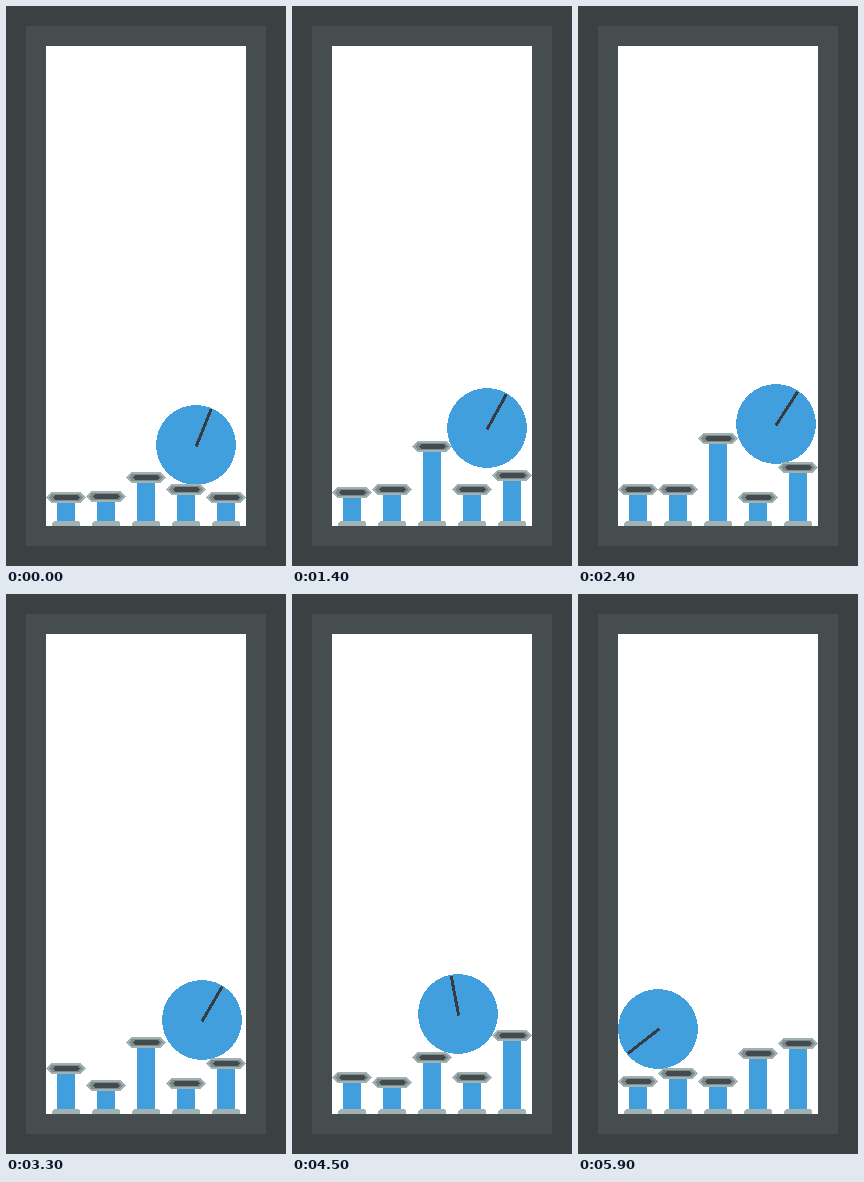
An HTML page for the animation above (6000 ms loop, 280 by 560 pixels).

```html
<!DOCTYPE html>
<html lang="en">
<head>
<meta charset="utf-8">
<title>Pistons and ball</title>
<style>
  html, body { margin: 0; width: 100%; height: 100%; overflow: hidden; background: #3b4042; }
  svg { display: block; shape-rendering: crispEdges; }
  .blue { fill: #419fdd; }
  .base { fill: #a2b2b3; }
  .rim { fill: #7f8c8c; stroke: #a2b2b3; stroke-width: 2; stroke-linejoin: round; }
  .slot { fill: #444b4e; }
  .hand { stroke: #363c3f; stroke-width: 3; }
</style>
</head>
<body>
<svg width="280" height="560" viewBox="0 0 280 560">
  <defs>
    <path id="base" class="base" d="M-14 520v-3l2-2h24l2 2v3z"/>
    <g id="cap">
      <path class="rim" d="M-18.5 0l4-4.5h29l4 4.5l-4 4.5h-29z"/>
      <path class="slot" d="M-13.5 0l2.5-2.5h22l2.5 2.5l-2.5 2.5h-22z"/>
    </g>
  </defs>
  <path fill="#3b4042" d="M0 0h280v560H0z"/>
  <path fill="#454d4f" d="M20 20h240v520H20z"/>
  <path fill="#fff" d="M40 40h200v480H40z"/>
  <g id="rods"></g>
  <g id="ball">
    <circle class="blue" r="40"/>
    <path id="hand" class="hand" d="M0 1V-39"/>
  </g>
  <g id="caps"></g>
</svg>
<script>
const LOOP = 6000, STEP = 100;
const FLOOR = 515, RADIUS = 40;
const CAP_FLAT = 15, CAP_ROUND = 4;   // contact shape of a cap: a capsule
const ROLL = 42, START_ANGLE = 22;

// Turning points as [time, position], with constant speed in between
const pistonTracks = [
  [[0, 491], [2400, 483], [3300, 474], [5100, 487]],
  [[0, 490], [1400, 483], [2400, 483], [3300, 491], [5100, 487], [5900, 479]],
  [[0, 471], [700, 466], [1400, 440], [2400, 432], [3900, 459], [5100, 467], [5900, 487]],
  [[1400, 483], [2400, 491], [3900, 487], [5100, 479], [5900, 459]],
  [[0, 491], [1400, 469], [2400, 461], [3300, 469], [3900, 438], [5900, 449]]
];
const ballTrack = [[0, 190], [1400, 195], [2400, 198], [3300, 196], [3900, 168], [5100, 164], [5900, 80]];

function follow(track, t) {
  const i = track.findIndex(([time]) => time > t);
  if (i === 0) return track[0][1];
  if (i < 0) return track[track.length - 1][1];
  const [t0, v0] = track[i - 1], [t1, v1] = track[i];
  return v0 + (v1 - v0) * (t - t0) / (t1 - t0);
}

// Ball centre height at which it rests on a cap
function restHeight(ballX, capX, capY) {
  const reach = RADIUS + CAP_ROUND;
  const dx = Math.max(0, Math.abs(ballX - capX) - CAP_FLAT);
  return dx < reach ? capY - Math.sqrt(reach * reach - dx * dx) : FLOOR - RADIUS;
}

const byId = id => document.getElementById(id);

function add(parent, tag, attrs) {
  const node = document.createElementNS('http://www.w3.org/2000/svg', tag);
  for (const name in attrs) node.setAttribute(name, attrs[name]);
  return byId(parent).appendChild(node);
}

function place(node, x, y) {
  node.setAttribute('transform', `translate(${x} ${y})`);
}

const pistons = pistonTracks.map((track, i) => {
  const x = 60 + i * 40;
  const rod = add('rods', 'rect', { class: 'blue', x: x - 9, width: 18 });
  add('rods', 'use', { href: '#base', x });
  return { x, track, rod, cap: add('caps', 'use', { href: '#cap' }) };
});

function draw(t) {
  const x = follow(ballTrack, t);
  let y = FLOOR - RADIUS;
  for (const p of pistons) {
    const capY = follow(p.track, t);
    const top = Math.round(capY);
    p.rod.setAttribute('y', top);
    p.rod.setAttribute('height', FLOOR - top);
    place(p.cap, p.x, top + 0.5);
    y = Math.min(y, restHeight(x, p.x, capY));
  }
  place(byId('ball'), Math.round(x), Math.round(y));
  const angle = START_ANGLE + (x - ballTrack[0][1]) / ROLL * 180 / Math.PI;
  byId('hand').setAttribute('transform', `translate(.5 .5) rotate(${angle})`);
}

const start = performance.now();
function tick() {
  const t = (performance.now() - start) % LOOP;
  draw(Math.floor(t / STEP) * STEP);
  requestAnimationFrame(tick);
}
tick();
</script>
</body>
</html>
```
